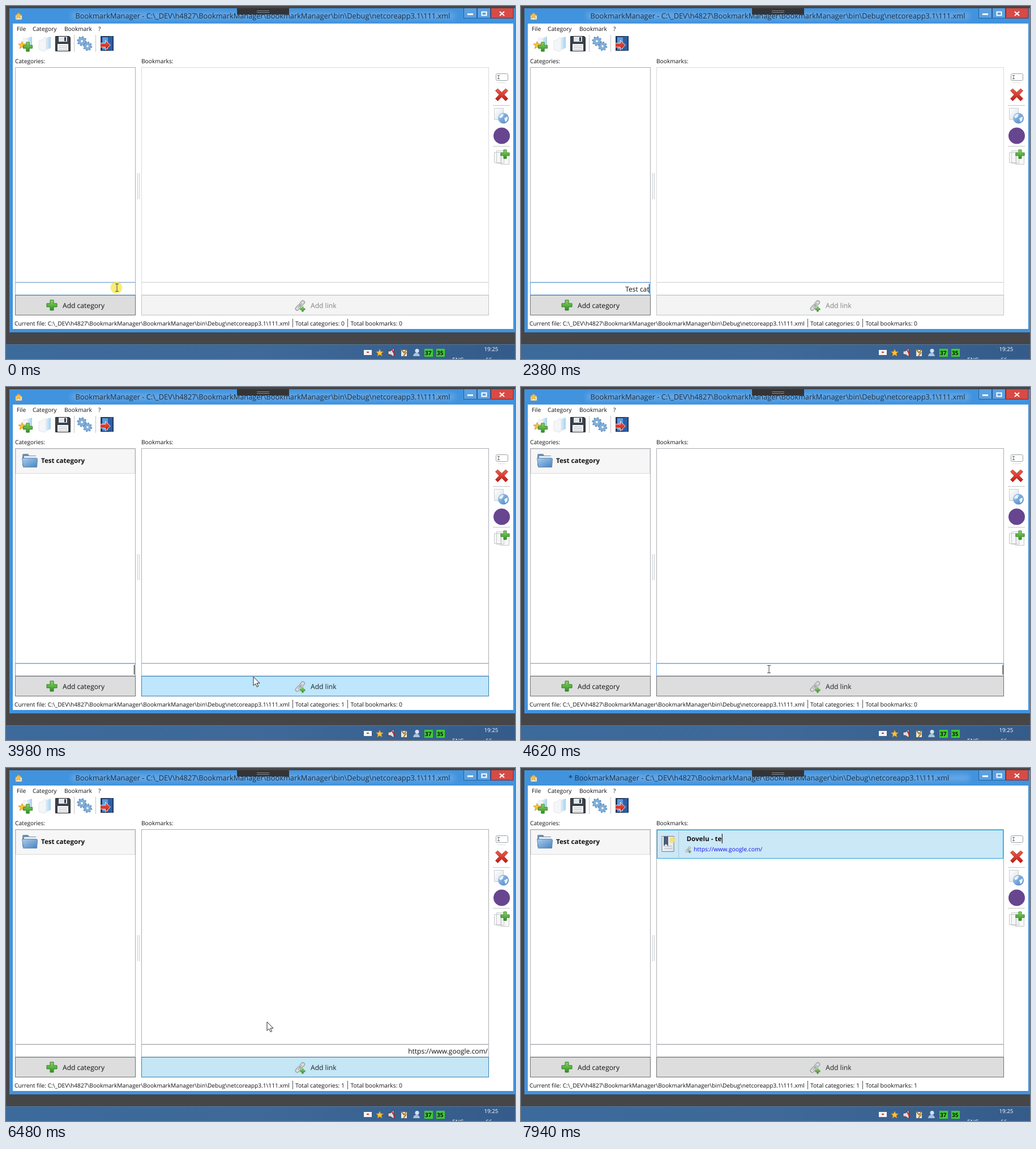
An HTML page for the animation above (8000 ms loop, 899x623 px).

```html
<!DOCTYPE html>
<html lang="en">
<head>
<meta charset="utf-8">
<title>Bookmark manager</title>
<style>
html, body { margin: 0; width: 100%; height: 100%; overflow: hidden; background: #464648; }
svg { display: block; }
text { font: 10.2px "Open Sans", "Noto Sans", sans-serif; white-space: pre; text-rendering: geometricPrecision; fill: #111; }
.title { font-size: 12.8px; fill: #1d3043; }
.mid { font-size: 12.1px; }
.bold { font-size: 11.6px; font-weight: 700; }
.count { font-size: 10.35px; }
.menu text { font-size: 10.6px; }
.end { font-size: 12px; text-anchor: end; }
.menu .dim { fill: #8a8a8a; }
.tray { fill: #fff; }
.box { fill: #fff; stroke: #abadb3; }
.off { stroke: #d9dadd; }
.btn { fill: #ddd; stroke: #707070; }
.line { stroke: #c4c4c4; fill: none; }
</style>
</head>
<body>
<svg width="899" height="623" viewBox="0 0 899 623">
<defs>
  <linearGradient id="bar"><stop stop-color="#3c6a9b"/><stop offset=".5" stop-color="#3e6998"/><stop offset="1" stop-color="#345b8a"/></linearGradient>
  <linearGradient id="blue" x2="1" y2="1"><stop stop-color="#a9cdf0"/><stop offset="1" stop-color="#4a83bd"/></linearGradient>
  <linearGradient id="page" x2="1" y2="1"><stop stop-color="#fff"/><stop offset="1" stop-color="#d9e1e9"/></linearGradient>
  <linearGradient id="sheet" x2="1"><stop stop-color="#f4f8fb"/><stop offset="1" stop-color="#a5d2f0"/></linearGradient>
  <linearGradient id="green" x2="0" y2="1"><stop stop-color="#8fd860"/><stop offset="1" stop-color="#2f8f25"/></linearGradient>
  <linearGradient id="red" x2="0" y2="1"><stop stop-color="#f0604c"/><stop offset="1" stop-color="#bb1c14"/></linearGradient>
  <filter id="glow" x="-10%" y="-100%" width="120%" height="300%"><feGaussianBlur stdDeviation="4"/></filter>
  <path id="plus" d="M-3-9H3V-3H9V3H3V9H-3V3H-9V-3H-3Z" fill="url(#green)" stroke="#2f7d26"/>
  <path id="star" d="M0-7 2-2.3 7-2 3.2 1.3 4.5 6.4 0 3.6-4.5 6.4-3.2 1.3-7-2-2-2.3Z" fill="#f8c23c" stroke="#c98a1c" stroke-width=".8"/>
  <g id="link">
    <g transform="rotate(-48)" fill="#dfe2e3" stroke="#a3a8aa" stroke-width="1.6">
      <rect x="-10" y="-3" width="11" height="6" rx="3"/><rect x="1" y="-3" width="10" height="6" rx="3"/>
      <path d="M-5 0H6"/>
    </g>
    <use href="#plus" transform="translate(5 6) scale(.46)"/>
  </g>
  <g id="gear">
    <circle r="8" fill="none" stroke="#6d9cca" stroke-width="3" stroke-dasharray="3.140 3.140"/>
    <circle r="5" fill="#f3f8fc" stroke="#83b0da" stroke-width="4.500"/>
    <circle r="7.200" fill="none" stroke="#5a8abb" stroke-width=".7"/>
    <circle r="2.800" fill="none" stroke="#5a8abb" stroke-width=".7"/>
  </g>
</defs>

<!-- desktop and window -->
<rect width="899" height="623" fill="#464648"/>
<rect x="6" y="4" width="893" height="572" fill="#4193de"/>
<rect x="116" y="12" width="676" height="11" fill="#8fc0ee" opacity=".5" filter="url(#glow)"/>
<rect x="12" y="31" width="884" height="539" fill="#fff"/>
<path d="M17 17l5-5 6 5v7H17z" fill="#f6f3e6" stroke="#a99c76" stroke-width=".7"/>
<use href="#star" transform="translate(22 17) scale(.8)"/>
<text id="title" class="title" y="21.700"></text>
<path d="M408 4h92v11h-92z" fill="#343436"/>
<path d="M443 8.500h22M443 11.500h22" stroke="#8b8b8b"/>
<path d="M808.500 4V21.500H831.500V4M832.500 4V21.500H855.500V4" fill="#5aa0e2" stroke="#225f9e"/>
<path d="M856.500 4V21.500H896V4" fill="#d84a45" stroke="#752b32"/>
<path d="M815 14.500h10" stroke="#fff" stroke-width="3"/>
<path d="M840.500 10.500h8v6h-8z" fill="none" stroke="#fff" stroke-width="2"/>
<path d="M872 10l8 7M880 10l-8 7" stroke="#fff" stroke-width="2.200"/>

<text x="19" y="44">File</text><text x="47" y="44">Category</text><text x="103" y="44">Bookmark</text><text x="163" y="44">?</text>

<!-- toolbar -->
<path d="M35 57l11-3v20l-11 4z" fill="url(#sheet)"/>
<path d="M31 57l8 2v20l-8-2z" fill="#f4f6f8" stroke="#d3dbe3" stroke-width=".6"/>
<use href="#star" transform="translate(28.500 69) scale(.95)"/>
<use href="#plus" transform="translate(38.500 72) scale(.9)"/>
<path d="M68 57l11-3v20l-11 5z" fill="url(#sheet)"/>
<path d="M58 61q8-1 10-6l3 2v21l-4 2-9-3z" fill="#f4f6f8" stroke="#d3dbe3" stroke-width=".6"/>
<path d="M87.500 53.500h24l2 2v24h-26z" fill="#3c4148" stroke="#23262b"/>
<path d="M93 54h15v9h-15z" fill="#dfe6ee"/><path d="M103 55h3v7h-3z" fill="#3c4148"/>
<path d="M91 67h19v12h-19z" fill="#f5f7f9"/><path d="M93 70.500h15M93 73.500h15M93 76.500h15" stroke="#b9c0c8"/>
<path class="line" d="M120.500 51v30M158.500 51v30"/>
<use href="#gear" transform="translate(134 62) scale(.92)"/>
<use href="#gear" transform="translate(144 71) scale(.88)"/>
<path d="M167 53h23v26h-23z" fill="#263b5d"/><path d="M170 55h18v22h-18z" fill="#5b9be0"/><path d="M180 55l8-2v26l-8-2z" fill="#2b5fa5"/>
<path d="M166.500 65.500h9v-5l9 8.500-9 8.500v-5h-9z" fill="url(#red)" stroke="#fff" stroke-width=".8"/>

<!-- side bar -->
<rect x="865.500" y="119.500" width="21" height="12" rx="2" fill="#fff" stroke="#9aa0a6"/>
<path d="M868 122.500h4M868 128.500h4M870 122.500v6" stroke="#666"/>
<path d="M868 135.500h15" stroke="#ddd"/>
<path d="M868.500 146l7 6.500 7-6.500 4 3.500-6.500 7 6.500 7-4 4-7-7-7 7-4-4 6.500-7-6.500-7z" fill="url(#red)" stroke="#9c1b15" stroke-width=".7"/>
<path class="line" d="M860 175.500h30M860 247.500h30"/>
<path d="M862.500 180.500h16v20h-16z" fill="url(#page)" stroke="#c8cdd2"/>
<circle cx="878.500" cy="198" r="9.500" fill="url(#blue)"/>
<path d="M871 195q4-6 8-4l-2 5-4 2zM880 198l6-3q1 7-4 10z" fill="#e7f3fd"/>
<circle cx="875.500" cy="229" r="14.500" fill="#68458f"/>
<g fill="#f7f7f7" stroke="#c6c9cc"><path d="M862.500 258.500h13v18h-13zM866.500 255.500h13v22h-13zM873.500 261.500h15v18h-15z"/></g>
<use href="#plus" transform="translate(881.500 261.500) scale(.85)"/>

<!-- panes -->
<text x="16" y="101">Categories:</text><text x="239" y="101">Bookmarks:</text>
<rect class="box" x="16.500" y="108.500" width="212" height="379"/>
<rect class="box right" x="239.500" y="108.500" width="613" height="379"/>
<rect id="catField" class="box" x="16.500" y="488" width="212" height="22"/>
<rect id="linkField" class="box right" x="239.500" y="488" width="613" height="22"/>
<path d="M232.500 295v46M235.500 295v46" stroke="#c8cbcd"/>
<rect class="btn" x="16.500" y="510.500" width="212" height="35"/>
<use href="#plus" x="81" y="528"/>
<text class="mid" x="100" y="533">Add category</text>
<rect id="addLink" class="btn" x="239.500" y="510.500" width="613" height="35"/>
<use href="#link" x="519" y="529"/>
<text id="addText" class="mid" x="538" y="533">Add link</text>

<g id="category">
  <rect x="17.500" y="109.500" width="210" height="43" fill="#f6f6f6" stroke="#dadada"/>
  <path d="M29 120q0-2 2-2h8l2 3h12v18h-24z" fill="#6f8fb0"/>
  <path d="M32 122h21v8h-21z" fill="#eef3f8"/>
  <path d="M28.500 125.500h25q2 0 2 2l-1 14h-24z" fill="url(#blue)" stroke="#4e79a6" stroke-width=".8"/>
  <text class="bold" x="62" y="134">Test category</text>
</g>
<g id="bookmark">
  <rect id="row" x="240.500" y="109.500" width="611" height="50"/>
  <path d="M278.500 112v46" stroke="#a9c3d2"/>
  <path d="M249 120.500h21v27h-21z" fill="url(#page)" stroke="#777e86"/>
  <path d="M262 126h7M262 130h7M253 138h14M253 142h14" stroke="#aab0b6"/>
  <path d="M252 121h8v17l-4-4-4 4z" fill="#4a5c78"/>
  <path d="M262 122h10v7l-3 3h-7z" fill="#f6e173" opacity=".85"/>
  <text id="name" class="bold" x="292.500" y="129"></text>
  <use href="#link" transform="translate(295 144) scale(.58)"/>
  <text x="305" y="147" style="font-size:10.350px;fill:#1414f0">https://www.google.com/</text>
</g>
<text id="catText" class="end" x="226.500" y="504"></text>
<text id="linkText" class="end" x="851" y="504">https://www.google.com/</text>
<rect id="caret" width="1" height="17"/>

<!-- status and task bar -->
<text x="15" y="564">Current file: <tspan id="path"></tspan></text>
<path d="M506.500 552v15M603.500 552v15" stroke="#555"/>
<text id="cats" class="count" x="511" y="564"></text><text id="marks" class="count" x="608.500" y="564"></text>
<rect y="597" width="899" height="26" fill="url(#bar)"/>
<path d="M0 597.500H899" stroke="#54789f"/>
<path d="M632 607h14v9h-14z" fill="#f4f4f4"/><path d="M637 611h4" stroke="#c33" stroke-width="2"/>
<use href="#star" transform="translate(660 612) scale(.9)"/>
<path d="M675 609h4l6-5v15l-6-4h-4z" fill="#d9dde1" stroke="#5a2a26" stroke-width=".8"/><path d="M682 607l5 9" stroke="#c22" stroke-width="2"/>
<path d="M698 607h10v11h-10z" fill="#ece7d4"/><path d="M698 606l5 6 4-5M702 618l5-7" fill="none" stroke="#a5762e" stroke-width="2"/>
<circle cx="726" cy="608.500" r="3.500" fill="#d5e2ef"/><path d="M719 618q1-6 6-6t6 6z" fill="#a8c4df"/>
<path d="M739 605h15v14h-15zM760 605h15v14h-15z" fill="#3ecb32"/>
<text x="740" y="616" style="font-weight:700">37</text><text x="761" y="616" style="font-weight:700">35</text>
<text class="tray" x="844.500" y="609" style="font-size:9.700px">19:25</text>
<text class="tray" x="788" y="628">ENG</text><text class="tray" x="847" y="628">66</text>

<g id="menu" class="menu">
  <rect x="438.500" y="498.500" width="138" height="63" fill="#f3f3f3" stroke="#989898"/>
  <path d="M466.500 501v58" stroke="#e2e2e2"/>
  <rect id="hot" x="441.500" y="540.500" width="132" height="18" fill="#c6e3ef" stroke="#3ea6d8"/>
  <text class="dim" x="473" y="515">Cut</text><text class="dim" x="525" y="515">Ctrl+X</text>
  <text class="dim" x="473" y="535">Copy</text><text class="dim" x="525" y="535">Ctrl+C</text>
  <text x="473" y="554">Paste</text><text x="525" y="554">Ctrl+V</text>
</g>

<g id="pointer">
  <circle id="click" cx="-1" r="10.500" fill="#f4e52e"/>
  <path id="arrow" d="M0 0V15.500L3.600 12.200 6.200 17.800 8.600 16.700 6 11.200H11Z" fill="#fff" stroke="#111" stroke-width=".9"/>
  <path id="beam" d="M-3-6.500H3M0-6.500V6.500M-3 6.500H3" fill="none" stroke="#444"/>
</g>
</svg>
<script>
const LOOP = 8000;
const $ = id => document.getElementById(id);
const show = (id, on) => $(id).style.display = on ? "" : "none";
const paint = (id, fill, stroke) => { $(id).style.fill = fill; $(id).style.stroke = stroke; };
const within = (t, a, b) => t >= a && t < b;

const file = "C:\\_DEV\\h4827\\BookmarkManager\\BookmarkManager\\bin\\Debug\\netcoreapp3.1\\111.xml";
$("path").textContent = file;

const category = "Test category", site = "Dovelu", suffix = " - te";
const catKeys = [1020, 1090, 1150, 1220, 1580, 1980, 2080, 2380, 2430, 2500, 2560, 2630, 2720];
const nameKeys = [7650, 7710, 7770, 7940, 7940];
const typed = (text, keys, t) => text.slice(0, keys.filter(k => k <= t).length);

// pointer track: time, x, y
const track = [
  [0, 196, 497], [3080, 196, 497], [3200, 236, 504], [3450, 330, 590], [3880, 437, 512],
  [4080, 437, 511], [4250, 438, 498], [4850, 438, 498], [5050, 452, 512], [5400, 496, 544],
  [5900, 496, 544], [6000, 490, 530], [6150, 490, 530], [6400, 461, 448], [6650, 461, 448],
  [6651, 380, 230], [6690, 347, 142], [6950, 347, 142], [7340, 899, 24]
];
const clicks = [[0, 250], [4280, 4480], [4720, 4850], [5400, 5570], [6000, 6150], [6800, 6950]];

function pointerAt(t) {
  const i = track.findIndex(k => k[0] > t);
  if (i < 0) return track[track.length - 1].slice(1);
  const [a, b] = [track[i - 1], track[i]], p = (t - a[0]) / (b[0] - a[0]);
  return [a[1] + (b[1] - a[1]) * p, a[2] + (b[2] - a[2]) * p];
}

function caretAt(t) {
  if (within(t, 100, 620) || within(t, 1020, 3420) || within(t, 3920, 4280)) return [226, 490.5];
  if (within(t, 4280, 4780) || within(t, 5280, 5570)) return [850.5, 490.5];
  const lit = within(t, 6650, 7000) || within(t, 7250, 7490) || t >= 7650;
  return lit && [293 + $("name").getComputedTextLength(), 116];
}

function render(t) {
  const [x, y] = pointerAt(t);
  const enabled = t >= 2920, added = t >= 6650, edited = t >= 7650;
  const menu = within(t, 4850, 5570);
  const seen = t < 1020 || within(t, 3080, 7340);

  $("title").textContent = (edited ? "* " : "") + "BookmarkManager - " + file;
  $("title").setAttribute("x", edited ? 84 : 122.5);
  $("cats").textContent = "Total categories: " + +enabled;
  $("marks").textContent = "Total bookmarks: " + +added;

  show("category", enabled);
  document.querySelectorAll(".right").forEach(e => e.classList.toggle("off", !enabled));
  $("catText").textContent = enabled ? "" : typed(category, catKeys, t);
  $("catField").style.stroke = t < 100 ? "#7eb4ea" : t < 4280 ? "#569de5" : "#abadb3";
  $("linkField").style.stroke = within(t, 4180, 4850) ? "#569de5" : "";
  show("linkText", within(t, 5670, 6650));

  const over = enabled && seen && !menu && within(x, 239, 853) && within(y, 510, 546);
  if (!enabled) paint("addLink", "#f4f4f4", "#bfc3c6");
  else if (over) paint("addLink", "#bee6fd", "#3c7fb1");
  else if (within(t, 6150, 6650)) paint("addLink", "#c4e6f5", "#3c7fb1");
  else paint("addLink", "", "");
  $("addText").style.fill = enabled ? "#222" : "#838383";

  show("bookmark", added);
  $("name").textContent = site + typed(suffix, nameKeys, t);
  if (t < 6850) paint("row", "#e5f3fb", "#70c0e7");
  else paint("row", "#cbe8f6", "#26a0da");

  show("menu", menu);
  show("hot", y >= 538);

  const caret = caretAt(t);
  show("caret", caret);
  if (caret) {
    $("caret").setAttribute("x", caret[0]);
    $("caret").setAttribute("y", caret[1]);
  }

  const beam = !menu && within(y, 488, 510);
  show("pointer", seen);
  show("beam", beam);
  show("arrow", !beam);
  $("pointer").setAttribute("transform", `translate(${x} ${y})`);
  const press = clicks.find(c => within(t, c[0], c[1]));
  $("click").style.opacity = press ? .66 * (1 - .6 * (t - press[0]) / (press[1] - press[0])) : 0;
}

function tick(now) {
  render(now % LOOP);
  requestAnimationFrame(tick);
}
render(0);
requestAnimationFrame(tick);
</script>
</body>
</html>
```
